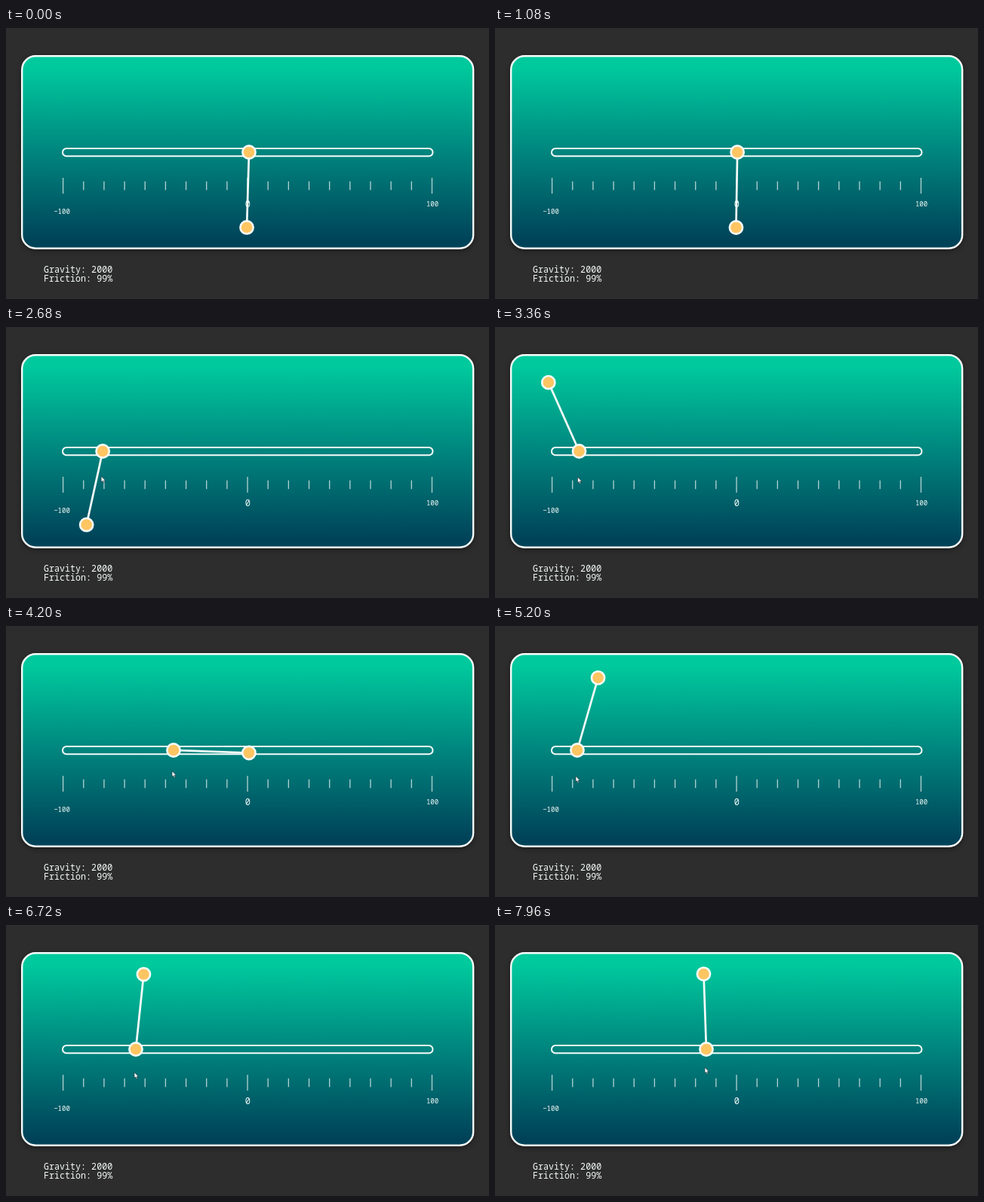
An HTML page that plays this animation: 640x360 px, repeating every 8 s.

```html
<!DOCTYPE html>
<html lang="en">
<head>
<meta charset="utf-8">
<title>Pendulum on a slider</title>
<style>
  html, body { margin: 0; width: 100%; height: 100%; overflow: hidden; background: #2d2d2d; }
  svg { display: block; width: 100vw; height: 100vh; --ink: #f6fcfa; }
  text { font-family: "Noto Sans Mono", "DejaVu Sans Mono", monospace; font-weight: 500; fill: var(--ink); white-space: pre; }
  .panel { fill: url(#depth); stroke: var(--ink); stroke-width: 2.4; filter: drop-shadow(0 2px 3px rgba(0, 0, 0, .4)); }
  .track { fill: none; stroke: var(--ink); stroke-width: 2; }
  .ticks { stroke: var(--ink); stroke-width: 1.3; opacity: .72; }
  .rod { stroke: var(--ink); stroke-width: 2.7; }
  .ball { fill: #fec562; stroke: var(--ink); stroke-width: 2.6; }
  .small { font-size: 9px; text-anchor: middle; }
  .zero { font-size: 12px; text-anchor: middle; }
  .info { font-size: 11.7px; }
</style>
</head>
<body>
<svg viewBox="0 0 640 360">
  <defs>
    <linearGradient id="depth" x1="0" y1="0" x2="0" y2="1">
      <stop offset=".06" stop-color="#00c99d"/>
      <stop offset=".5" stop-color="#00857e"/>
      <stop offset=".96" stop-color="#004359"/>
    </linearGradient>
  </defs>
  <rect class="panel" x="21.2" y="37.3" width="598" height="255.4" rx="18"/>
  <rect class="track" x="75" y="160" width="490.5" height="10.3" rx="5.15"/>
  <g class="ticks" id="ticks"></g>
  <text class="small" x="74" y="246.5">−100</text>
  <text class="zero" x="320.3" y="238">0</text>
  <text class="small" x="565" y="236.5">100</text>
  <text class="info" x="50" y="324.5">Gravity: 2000</text>
  <text class="info" x="50" y="337">Friction: 99%</text>
  <line class="rod" id="rod"/>
  <circle class="ball" id="cart" cy="165" r="8.6"/>
  <circle class="ball" id="bob" r="8.6"/>
  <path id="pointer" d="M0 0V7.6L1.7 6.1 3 9 4.2 8.4 3.1 5.6H5.5Z" fill="#fff" stroke="#142b30" stroke-width=".6"/>
</svg>
<script>
const LOOP = 8000, STEP = 40, LENGTH = 100, RAIL_Y = 165, POINTER_FROM = 1200;
const el = id => document.getElementById(id);
const set = (node, attrs) => {
  for (const name in attrs) node.setAttribute(name, attrs[name]);
};

for (let i = 0; i <= 18; i++) {
  const x = 75.6 + i * 27.16;
  const half = i % 9 ? 5.7 : 10.5;
  const tick = document.createElementNS('http://www.w3.org/2000/svg', 'line');
  set(tick, { x1: x, x2: x, y1: 209.5 - half, y2: 209.5 + half });
  el('ticks').append(tick);
}

// Main poses; the angle is in degrees from straight down.
const poses = [
  { t: 0, x: 322, angle: -1.7 },
  { t: 1640, x: 320, angle: 0 },
  { t: 2000, x: 265, angle: 33 },
  { t: 2500, x: 137, angle: 14 },
  { t: 3360, x: 111.5, angle: -156 },
  { t: 3700, x: 121, angle: -90 },
  { t: 4200, x: 222, angle: 88 },
  { t: 5200, x: 109, angle: 164 },
  { t: 6720, x: 172, angle: 174 },
  { t: 7960, x: 280, angle: 182 }
];

// Cubic curve through the poses that does not overshoot at turning points.
function curve(part, t) {
  const last = poses.length - 1;
  const next = poses.findIndex(pose => pose.t > t);
  if (next < 0) return poses[last][part];
  const i = next - 1, p = poses[i], q = poses[next];
  const slope = n => (poses[n + 1][part] - poses[n][part]) / (poses[n + 1].t - poses[n].t);
  const tangent = n => {
    if (n === 0 || n === last) return 0;
    const a = slope(n - 1), b = slope(n);
    return a * b <= 0 ? 0 : 2 * a * b / (a + b);
  };
  const span = q.t - p.t, u = (t - p.t) / span, w = 1 - u;
  return p[part] * w * w * (1 + 2 * u) + q[part] * u * u * (3 - 2 * u)
    + span * u * w * (tangent(i) * w - tangent(next) * u);
}

function draw(t) {
  const x = curve('x', t);
  const angle = curve('angle', t) * Math.PI / 180;
  const bobX = x + LENGTH * Math.sin(angle);
  const bobY = RAIL_Y + LENGTH * Math.cos(angle);
  set(el('rod'), { x1: x, y1: RAIL_Y, x2: bobX, y2: bobY });
  set(el('cart'), { cx: x });
  set(el('bob'), { cx: bobX, cy: bobY });
  // The hand sinks a little as it reaches to the left.
  set(el('pointer'), {
    transform: `translate(${x - 2} ${206 - x * 0.06})`,
    visibility: t < POINTER_FROM ? 'hidden' : 'visible'
  });
}

const start = performance.now();
function frame() {
  const t = (performance.now() - start) % LOOP;
  draw(Math.floor(t / STEP) * STEP);
  requestAnimationFrame(frame);
}
frame();
</script>
</body>
</html>
```
